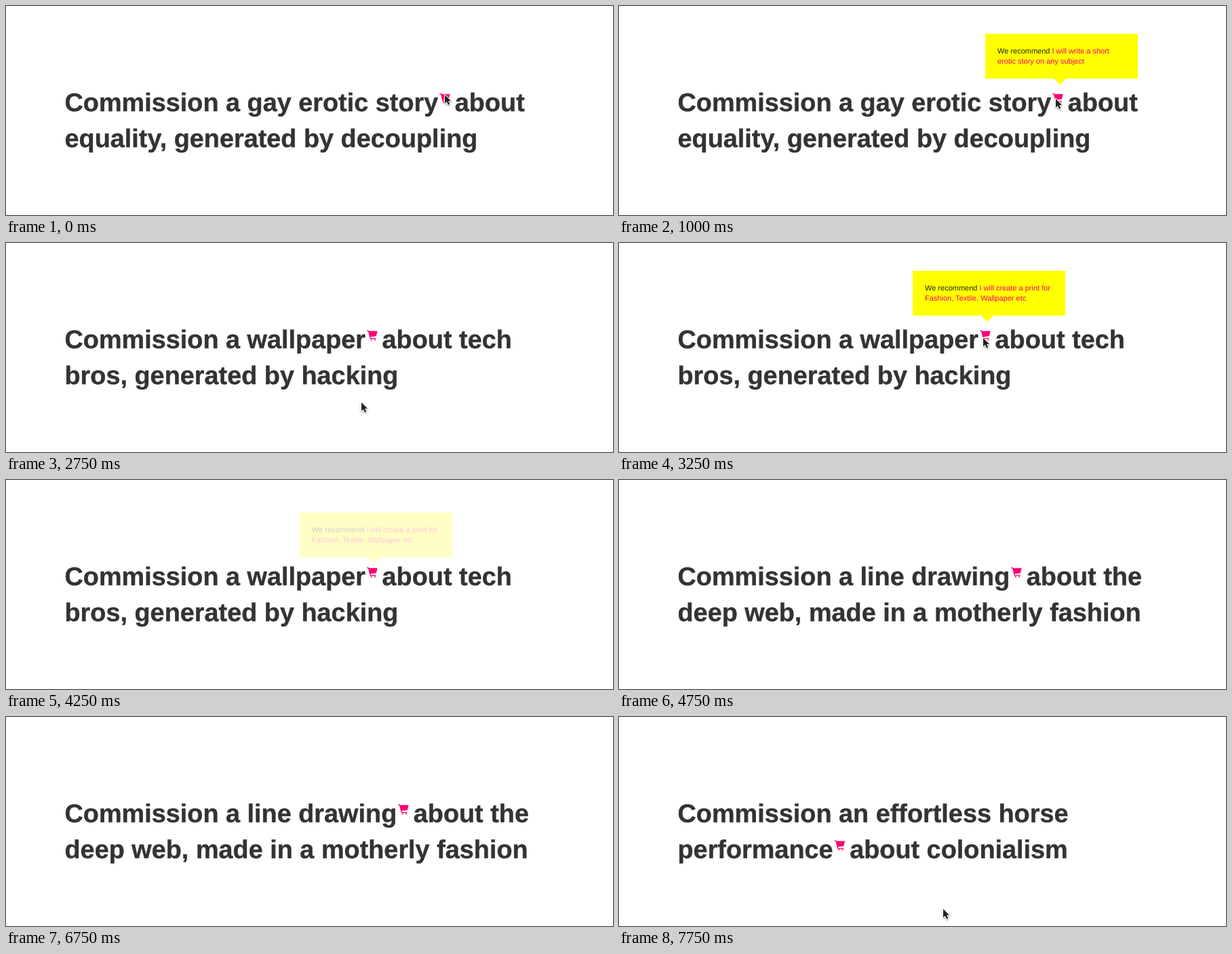
An HTML page for the animation above (8000 ms loop, 895 by 308 pixels).

```html
<!DOCTYPE html>
<html lang="en">
<head>
<meta charset="utf-8">
<title>Commission</title>
<style>
  html, body { margin: 0; width: 100%; height: 100%; overflow: hidden; background: #fff; }
  svg { display: block; }
  text { font-family: "Liberation Sans", Arial, sans-serif; text-rendering: geometricPrecision; white-space: pre; }
  .heading { font-size: 37.85px; font-weight: bold; fill: #333; stroke: #333; stroke-width: .4; }
  .tip text { font-size: 11px; fill: #222; }
  .tip .link, .cart { fill: #ff0076; }
  .cart .line { fill: none; stroke: #ff0076; stroke-width: 1.4; }
  #cursor { fill: #222; stroke: #fff; stroke-width: 2; paint-order: stroke; stroke-linejoin: round;
            filter: drop-shadow(0 1px 1px rgba(0, 0, 0, .4)); }
</style>
</head>
<body>
<svg width="895" height="308" viewBox="0 0 895 308">
  <g id="stage"></g>
  <path id="cursor" d="M0 0V12.6L2.9 9.9L5 14.8L7.3 13.8L5.2 9.1H9.1Z"/>
</svg>
<script>
const LOOP = 8000;
const TIP_TOP = 41;

// In each heading, "|" marks the place of the cart icon.
const scenes = [
  { lines: ["Commission a gay erotic story|about", "equality, generated by decoupling"],
    cart: [639.3, 128], tipX: 540, tip: ["I will write a short", "erotic story on any subject"] },
  { lines: ["Commission a wallpaper|about tech", "bros, generated by hacking"],
    cart: [532.3, 128], tipX: 433, tip: ["I will create a print for", "Fashion, Textile, Wallpaper etc"] },
  { lines: ["Commission a line drawing|about the", "deep web, made in a motherly fashion"],
    cart: [578.3, 128], tipX: 479, tip: ["I will draw line drawing", "for coloring book on any subject"] },
  { lines: ["Commission an effortless horse", "performance|about colonialism"],
    cart: [317.8, 181] }
];

// Each step holds until the next; drop is how far the tooltip has sunk while fading.
const steps = [
  { at: 0, scene: 0, cursor: [647, 131] },
  { at: 250, scene: 0, drop: 0, cursor: [646, 135] },
  { at: 1000, scene: 0, drop: 0, cursor: [644, 137] },
  { at: 1250, scene: 0, drop: 7 },
  { at: 1500, scene: 0 },
  { at: 1750, scene: 1 },
  { at: 2750, scene: 1, cursor: [524, 235] },
  { at: 3000, scene: 1, drop: 2, cursor: [538, 148] },
  { at: 3250, scene: 1, drop: 0, cursor: [537, 140] },
  { at: 4250, scene: 1, drop: 7 },
  { at: 4500, scene: 1 },
  { at: 4750, scene: 2 },
  { at: 5250, scene: 2, cursor: [550, 213] },
  { at: 5500, scene: 2, cursor: [576, 143] },
  { at: 5750, scene: 2, drop: 0, cursor: [577, 138] },
  { at: 6500, scene: 2, drop: 1, cursor: [545, 256] },
  { at: 6750, scene: 2 },
  { at: 7250, scene: 3 },
  { at: 7750, scene: 3, cursor: [478, 283] }
];

const move = (x, y) => `translate(${x} ${y})`;

const headingLine = (line, i) => {
  const [before, after = ""] = line.split("|");
  return `<text class="heading" x="86.5" y="${155 + 53 * i}">${before}<tspan dx="24.5">${after}</tspan></text>`;
};

const cartIcon = ([x, y]) => `<g class="cart" transform="${move(x, y)}">
  <path class="line" d="M0 1.2L2.4 1.8L5 12.6H13.4"/>
  <path d="M2.2 1.8H15.4L13.6 9.2L4.2 10.4Z"/>
  <circle cx="6.6" cy="14.6" r="1.1"/><circle cx="11.8" cy="14.6" r="1.1"/></g>`;

const tooltip = ({ tipX, tip }, drop) =>
  `<g class="tip" transform="${move(tipX, TIP_TOP + drop)}" opacity="${1 - drop / 9}">
  <path fill="#ff0" d="M0 0H225V66H119L110 75L101 66H0Z"/>
  <text x="18" y="29">We recommend <tspan class="link">${tip[0]}</tspan></text>
  <text x="18" y="44"><tspan class="link">${tip[1]}</tspan></text></g>`;

const stage = document.getElementById("stage");
const cursor = document.getElementById("cursor");
let shown;

function show({ scene, drop, cursor: point }) {
  const data = scenes[scene];
  stage.innerHTML = data.lines.map(headingLine).join("") + cartIcon(data.cart) +
    (drop === undefined ? "" : tooltip(data, drop));
  cursor.style.display = point ? "" : "none";
  if (point) cursor.setAttribute("transform", move(...point));
}

function tick() {
  const time = performance.now() % LOOP;
  const step = steps.findLast(s => s.at <= time);
  if (step !== shown) show(shown = step);
  requestAnimationFrame(tick);
}
tick();
</script>
</body>
</html>
```
